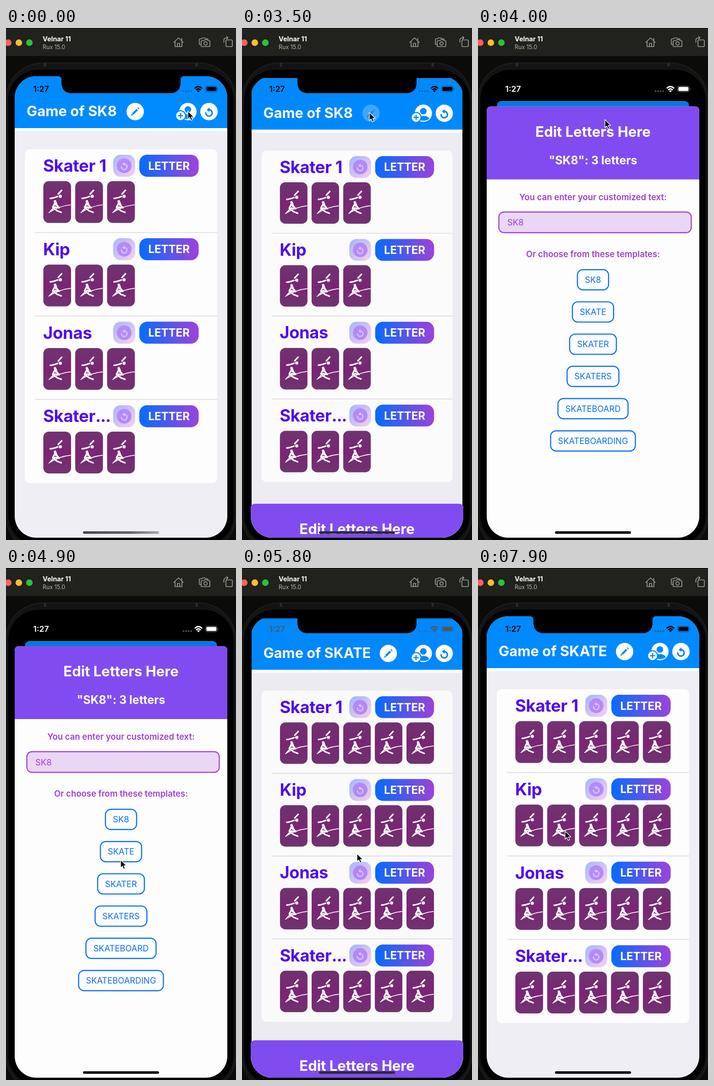
Recreate the animation shown at these times as an HTML page. Size 502 by 1115 pixels, loop 8000 ms.

```html
<!DOCTYPE html>
<html lang="en">
<head>
<meta charset="utf-8">
<title>Game of SK8</title>
<style>
  html, body { margin: 0; width: 100%; height: 100%; overflow: hidden; background: #0a0a0a; }
  svg { display: block; width: 100vw; height: 100vh; font-family: Inter, "Liberation Sans", sans-serif; }
  .b { font-weight: 700; }
  .sb { font-weight: 600; }
  .mid { text-anchor: middle; }
  .white { fill: #fff; }
  .name { font-size: 36.5px; letter-spacing: -.3px; fill: #4f0cf0; }
  .dots { letter-spacing: -1.2px; }
  .hint { font-size: 18.5px; fill: #a03fd2; }
  .line { fill: none; stroke-linecap: round; stroke-linejoin: round; }
  .tool { fill: none; stroke: #9c9c99; stroke-width: 1.7; stroke-linejoin: round; stroke-linecap: round; }
</style>
</head>
<body>
<svg viewBox="0 0 502 1115" preserveAspectRatio="none">
  <defs>
    <clipPath id="screen"><rect x="19" y="105" width="464" height="1005" rx="47"/></clipPath>
    <clipPath id="page"><rect x="19" y="105" width="464" height="1010" rx="11"/></clipPath>
    <linearGradient id="letterFill">
      <stop offset="0" stop-color="#066cff"/><stop offset="1" stop-color="#9d43da"/>
    </linearGradient>
    <linearGradient id="undoFill" x1="0" y1="0" x2="1" y2="1">
      <stop offset="0" stop-color="#a5b6ff"/><stop offset="1" stop-color="#fad0ec"/>
    </linearGradient>
    <linearGradient id="cardFill" x1="0" y1="0" x2="0" y2="1">
      <stop offset="0" stop-color="#703470"/><stop offset=".5" stop-color="#7a2574"/><stop offset="1" stop-color="#703470"/>
    </linearGradient>
    <linearGradient id="barFill">
      <stop offset="0" stop-color="#484848"/><stop offset=".6" stop-color="#606060"/><stop offset="1" stop-color="#a8a8a8"/>
    </linearGradient>

    <g id="undo">
      <path class="line" d="M-7 2A7 7 0 1 0 1 -5" stroke="currentColor" stroke-width="3.3"/>
      <path d="M-5-5 1-10V0Z" fill="currentColor"/>
    </g>
    <g id="card">
      <rect width="60.5" height="91" rx="12" fill="url(#cardFill)"/>
      <circle cx="37" cy="33" r="3.5" fill="#fff"/>
      <g class="line" stroke="#fff" stroke-width="3.4">
        <path d="M32.500 28 40 20"/>
        <path d="M15 37.500Q22 37 31 33.500"/>
        <path d="M25.500 44 28 51" stroke-width="5.500"/>
        <path d="M26 46 20.500 57 30 64.500 39 68M28.500 51 34.500 58 25 56.500"/>
        <path d="M15 66 22 59" stroke-width="2.600"/>
        <path d="M11.500 69Q34 54 60 51.500" stroke-width="1.700" stroke-linecap="butt"/>
      </g>
    </g>
  </defs>

  <!-- simulator window -->
  <rect width="502" height="1115" fill="#0b0b0a"/>
  <rect y="3" width="502" height="58" fill="#21211e"/>
  <rect y="2" width="502" height="1" fill="#34342f"/>
  <circle cx="5" cy="32" r="7.2" fill="#ff5f57"/>
  <circle cx="28" cy="32" r="7.2" fill="#febc2e"/>
  <circle cx="51" cy="32" r="7.2" fill="#28c33c"/>
  <text class="b white" x="80" y="29" font-size="14.5">Velnar 11</text>
  <text x="80" y="46" font-size="12.5" fill="#b4b4b2">Rux 15.0</text>
  <g class="tool">
    <path d="M366 31.5 376.5 21.5 387 31.5M369 30V40.5H384V30M374 40V33.5H379V40M383.5 27V22.5"/>
    <path d="M425 36H424Q422 36 422 34V25.5Q422 23.5 424 23.5H427L429 21.5H434L436 23.5H439Q441 23.5 441 25"/>
    <path d="M428 27.5H432L434 25.5H439L441 27.5H443Q445 27.5 445 29.5V38.5Q445 40.5 443 40.5H428Q426 40.5 426 38.5V29.5Q426 27.5 428 27.5Z"/>
    <circle cx="435.5" cy="33.7" r="3.6"/>
    <rect x="480" y="26" width="14" height="14.5" rx="2"/>
    <path d="M475.5 31V27Q475.5 21.5 481 21.5H484M481.5 18.5 484.5 21.5 481.5 24.5"/>
  </g>

  <!-- handset -->
  <rect x="-1" y="76" width="503" height="1066" rx="82" fill="#131313" stroke="#222" stroke-width="1.5"/>
  <path d="M85 76V84M416 76V84" stroke="#2c2c2c" stroke-width="5"/>
  <rect x="4" y="90" width="494" height="1038" rx="68" fill="#000" stroke="#1a1a1a"/>

  <g clip-path="url(#screen)">
    <g id="app">
      <g clip-path="url(#page)">
        <rect x="19" y="105" width="464" height="1010" fill="#efeef4"/>
        <rect x="19" y="105" width="464" height="113" fill="#008aff"/>
        <rect x="19" y="218" width="464" height="6.5" fill="#fff"/>
        <text id="title" class="b white" x="45" y="192" font-size="31"></text>
        <g id="pencil">
          <circle r="19" fill="#fff"/>
          <path d="M-5.5 5.5 4.5-4.5M6.2-6.2 7.8-7.8" stroke="#0a84f0" stroke-width="4.2"/>
          <path d="M-9.5 9.5-7.7 4.7-4.7 7.7Z" fill="#0a84f0"/>
        </g>
        <g transform="translate(397 182)" fill="#008aff">
          <circle r="19" fill="#fff"/>
          <circle cy="-4.5" r="7.2"/>
          <path d="M-13 12Q-10 5.5 0 5.5T13 12Q8 16.5 0 16.5T-13 12Z"/>
          <circle cx="-16" cy="9" r="12"/>
          <circle cx="-16" cy="9" r="9.7" fill="#fff"/>
          <path d="M-21.5 9H-10.5M-16 3.5V14.5" stroke="#008aff" stroke-width="2.6"/>
        </g>
        <circle cx="443" cy="182" r="19" fill="#fff"/>
        <use href="#undo" x="443" y="183" color="#0a84f0"/>
        <rect x="41" y="264" width="420" height="727" rx="10" fill="#fdfdfd"/>
        <g id="rows"></g>
        <rect id="shade" x="19" y="105" width="464" height="1010"/>
      </g>
    </g>
    <path d="M113 100V105Q121 105 121 113V118C121 134 129 142 145 142H357C373 142 381 134 381 118V113Q381 105 389 105V100Z"/>

    <g id="sheet">
      <path d="M19 1010V10Q19 0 29 0H473Q483 0 483 10V1010Z" fill="#fdfdfd"/>
      <path d="M19 159V10Q19 0 29 0H473Q483 0 483 10V159Z" fill="#804cf0"/>
      <text class="b mid white" x="251" y="66" font-size="31">Edit Letters Here</text>
      <text id="count" class="b mid white" x="251" y="126" font-size="25"></text>
      <text class="sb mid hint" x="251" y="204">You can enter your customized text:</text>
      <rect x="45.5" y="230" width="420" height="45" rx="11" fill="#ead6f5" stroke="#a046d4" stroke-width="2.4"/>
      <text id="field" class="hint" x="64" y="259.5"></text>
      <text class="sb mid hint" x="251" y="328">Or choose from these templates:</text>
      <g id="templates"></g>
    </g>

    <g id="status">
      <text class="sb" x="59.5" y="139" font-size="17.5">1:27</text>
      <g opacity=".3">
        <circle cx="387.5" cy="137.5" r="1.9"/><circle cx="393" cy="137.5" r="1.9"/>
        <circle cx="398.5" cy="137.5" r="1.9"/><circle cx="404" cy="137.5" r="1.9"/>
      </g>
      <path d="M412 131.5Q420 123.5 428 131.5M415 135Q420 130 425 135" fill="none" stroke="currentColor" stroke-width="2.6"/>
      <path d="M417 137Q420 134.2 423 137L420 140Z"/>
      <rect x="435.5" y="126.5" width="25.5" height="12.5" rx="4" fill="none" stroke="currentColor" stroke-opacity=".45"/>
      <rect x="437.3" y="128.3" width="22" height="9" rx="2.4"/>
      <path d="M462.5 130.5Q464.5 132.7 462.5 135Z" opacity=".5"/>
    </g>
    <rect id="bar" x="168" y="1096" width="166" height="5.5" rx="2.7"/>
  </g>

  <path id="cursor" d="M0 0V17.5L4 13.8 6.8 20.2 10 18.8 7.2 12.6H12.7Z" stroke="#fff" stroke-width="1.3" stroke-linejoin="round"/>
</svg>

<script>
  const LOOP = 8000, STEP = 100;
  const OPEN = 3474.7, CLOSE = 5577;
  const $ = id => document.getElementById(id);
  const clamp = v => Math.min(1, Math.max(0, v));
  const ease = v => v * v * (3 - 2 * v);

  // critically damped spring, 0 to 1
  const spring = ms => {
    const x = Math.max(0, ms) * 0.01825;
    return 1 - (1 + x) * Math.exp(-x);
  };

  const row = (name, i) => {
    const cards = [0, 1, 2, 3, 4].map(k =>
      `<use href="#card" x="${81.5 + k * 69.6}" y="333.5" ${k > 2 ? 'class="extra"' : ''}/>`).join('');
    const rule = i < 3 ? '<path d="M64 445.3H461" stroke="#d2d2d6" stroke-width="1.2"/>' : '';
    return `<g transform="translate(0 ${i * 181.8})">
      <text class="b name" x="81" y="313">${name}</text>
      <rect x="234" y="276" width="48" height="48" rx="16" fill="url(#undoFill)"/>
      <circle cx="258" cy="300" r="16" fill="#b48af9"/>
      <use href="#undo" transform="translate(258 300.5) scale(.86)" color="#d9c2ff"/>
      <rect x="291" y="276" width="129.5" height="48" rx="17" fill="url(#letterFill)"/>
      <text class="b mid white" x="355.7" y="308.7" font-size="24">LETTER</text>
      ${cards}${rule}</g>`;
  };
  $('rows').innerHTML = ['Skater 1', 'Kip', 'Jonas', 'Skater<tspan class="dots">...</tspan>'].map(row).join('');
  const extras = document.querySelectorAll('.extra');

  const template = ([word, w], i) => `<g transform="translate(251 ${355.5 + i * 70.2})">
    <rect x="${-w / 2}" width="${w}" height="44" rx="12" fill="none" stroke="#0a70f5" stroke-width="2.4"/>
    <text class="mid" y="28.7" font-size="18.3" fill="#0a70f5">${word}</text></g>`;
  $('templates').innerHTML = [['SK8', 68], ['SKATE', 90], ['SKATER', 102], ['SKATERS', 113],
    ['SKATEBOARD', 153], ['SKATEBOARDING', 185]].map(template).join('');
  const choice = $('templates').children[1];

  // time, x, y of the pointer tip
  const path = [[0, 397, 181], [500, 397, 181], [1800, 181, 179], [2200, 181, 179], [3000, 278, 184],
    [3900, 278, 184], [4800, 250, 637], [5300, 251, 622], [6300, 251, 622], [7300, 190, 573], [LOOP, 190, 573]];

  const pointer = t => {
    const i = path.findIndex((p, k) => k && t <= p[0]);
    const [t0, x0, y0] = path[i - 1], [t1, x1, y1] = path[i];
    const k = ease((t - t0) / (t1 - t0));
    return [x0 + (x1 - x0) * k, y0 + (y1 - y0) * k];
  };

  // opacity of a button pressed at a, released at b, then fading back
  const press = (t, a, b) => t < a ? 1 : 0.25 + 0.75 * clamp((t - b) / 250);

  function draw(t) {
    const word = t < 5500 ? 'SK8' : 'SKATE';
    const five = word.length > 3;
    const p = t < CLOSE ? spring(t - OPEN) : 1 - spring(t - CLOSE);
    const s = 1 - 0.097 * p;

    $('app').setAttribute('transform', `translate(${251 * (1 - s)} ${664 * (1 - s)}) scale(${s})`);
    $('shade').setAttribute('opacity', 0.12 * p);
    $('sheet').setAttribute('transform', `translate(0 ${1110 - 940 * p})`);
    $('sheet').style.display = p > 0.001 ? '' : 'none';

    $('title').textContent = 'Game of ' + word;
    $('pencil').setAttribute('transform', `translate(${five ? 320 : 282} 182)`);
    $('pencil').setAttribute('opacity', press(t, 3300, 3520));
    $('count').textContent = `"${word}": ${word.length} letters`;
    $('field').textContent = word;
    choice.setAttribute('opacity', press(t, 5400, 5520));
    extras.forEach(e => e.style.display = five ? '' : 'none');

    const lum = 255 * (t < 5000 ? clamp((t - 3580) / 240) : clamp((5880 - t) / 240));
    const ink = `rgb(${lum},${lum},${lum})`;
    $('status').setAttribute('fill', ink);
    $('status').setAttribute('color', ink);
    $('bar').setAttribute('fill', t < 3400 ? 'url(#barFill)' : p > 0.05 && p < 0.2 ? '#2c2c2c' : '#000');
    $('cursor').setAttribute('transform', `translate(${pointer(t)})`);
  }

  const start = performance.now();
  function tick() {
    const t = (performance.now() - start) % LOOP;
    draw(Math.floor(t / STEP) * STEP);
    requestAnimationFrame(tick);
  }
  tick();
</script>
</body>
</html>
```
